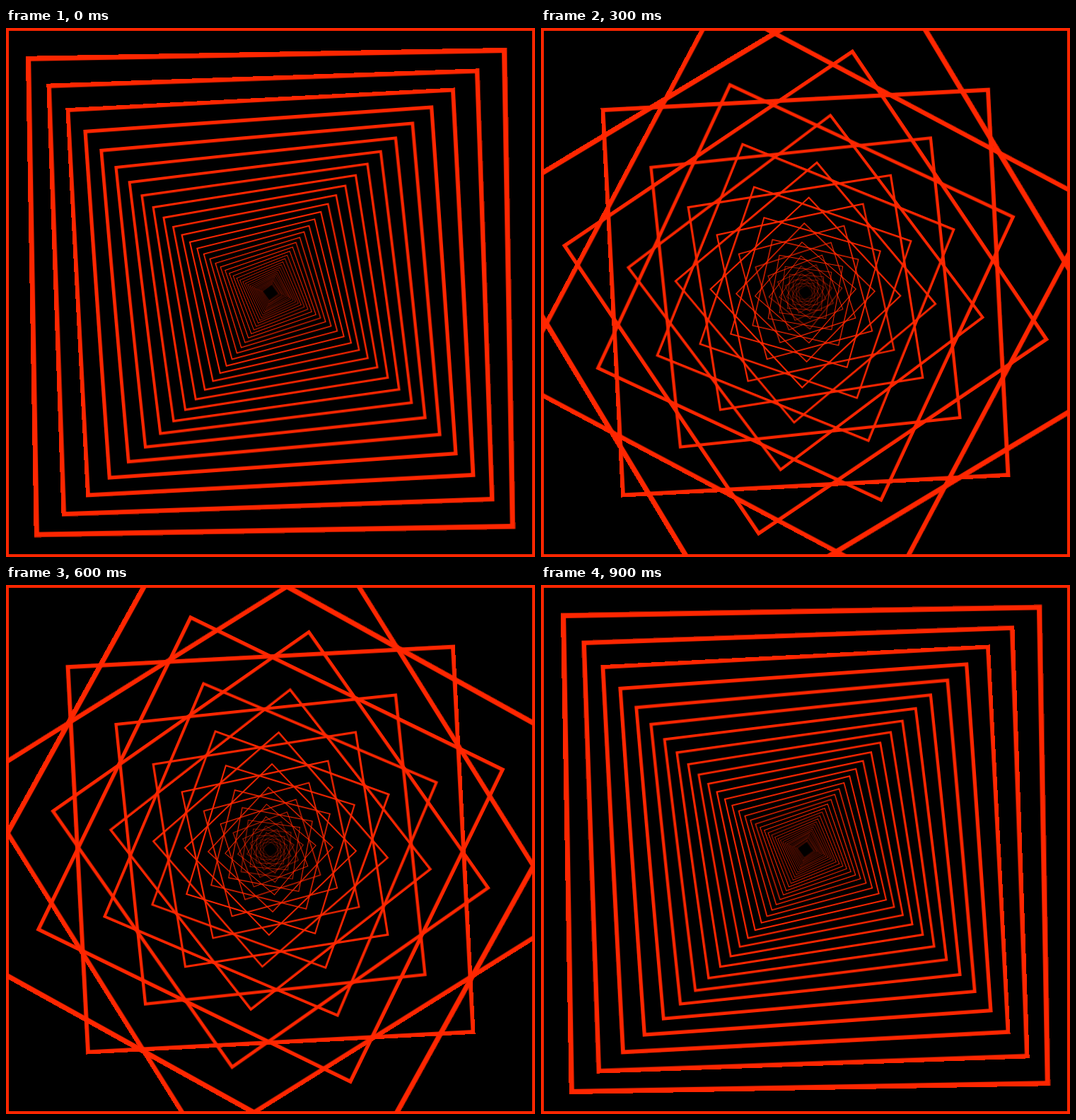
Recreate the animation shown at these times as an HTML page without scripts. Size 748 by 748 pixels, loop 1 s.

```html
<!DOCTYPE html>
<html lang="en">
<head>
<meta charset="utf-8">
<title>Square spiral</title>
<style>
  html, body {
    margin: 0;
    height: 100%;
    overflow: hidden;
    background: #000;
  }
  svg {
    display: block;
    width: 100%;
    height: 100%;
  }
  rect {
    x: -374px;
    y: -374px;
    width: 748px;
    height: 748px;
    fill: none;
    stroke: #ff2600;
    stroke-width: 8px;
  }
  /* Each group turns and shrinks relative to its parent. */
  g {
    transform-origin: 0 0;
    animation: twist 1s steps(10, end) infinite;
  }
  @keyframes twist {
    from { transform: rotate(-1deg) scale(.9); }
    to { transform: rotate(-101deg) scale(.9); }
  }
</style>
</head>
<body>
<svg viewBox="-374 -374 748 748">
  <rect/>
  <g><rect/><g><rect/><g><rect/><g><rect/><g><rect/><g><rect/>
  <g><rect/><g><rect/><g><rect/><g><rect/><g><rect/><g><rect/>
  <g><rect/><g><rect/><g><rect/><g><rect/><g><rect/><g><rect/>
  <g><rect/><g><rect/><g><rect/><g><rect/><g><rect/><g><rect/>
  <g><rect/><g><rect/><g><rect/><g><rect/><g><rect/><g><rect/>
  <g><rect/><g><rect/><g><rect/><g><rect/><g><rect/><g><rect/>
  </g></g></g></g></g></g>
  </g></g></g></g></g></g>
  </g></g></g></g></g></g>
  </g></g></g></g></g></g>
  </g></g></g></g></g></g>
  </g></g></g></g></g></g>
</svg>
</body>
</html>
```
